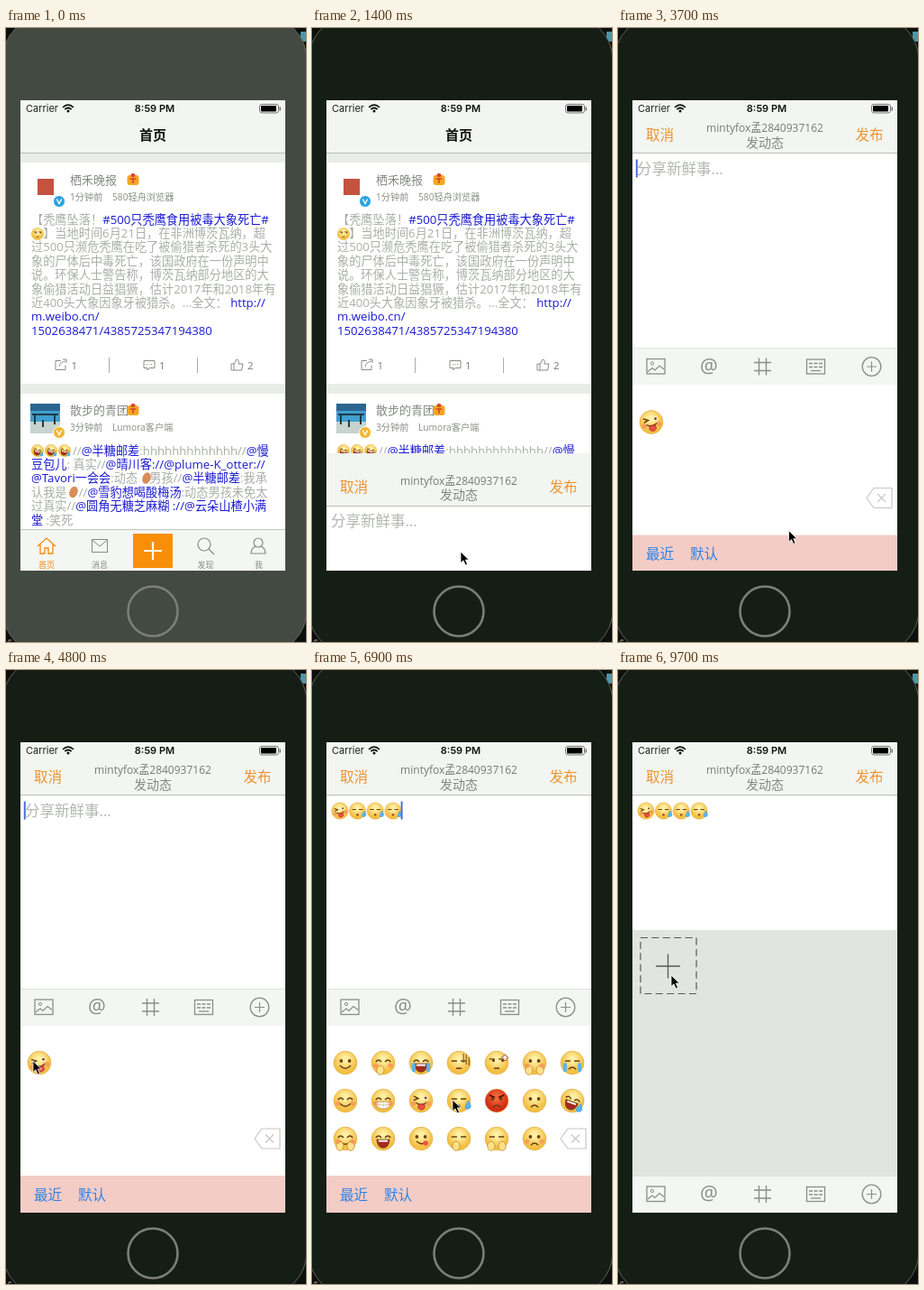
An HTML page that plays this animation: 333x680 px, repeating every 10 s.

```html
<!DOCTYPE html>
<html lang="zh">
<head>
<meta charset="utf-8">
<style>
html, body { margin: 0; width: 100%; height: 100%; overflow: hidden; background: #0c0f0c; }
svg { display: block; }
text { font-family: "Open Sans", "Noto Sans CJK SC", "Noto Sans CJK", sans-serif; }
.ui { font-family: Inter, "Noto Sans CJK SC", sans-serif; }
</style>
</head>
<body>
<svg id="stage" width="333" height="680" viewBox="0 0 333 680"></svg>
<script>
const rect = (x, y, w, h, fill, more = '') =>
  `<rect x="${x}" y="${y}" width="${w}" height="${h}" fill="${fill}" ${more}/>`;
const line = (d, stroke, w = 1, fill = 'none') =>
  `<path d="${d}" stroke="${stroke}" stroke-width="${w}" fill="${fill}"/>`;
const dot = (x, y, r, fill, more = '') =>
  `<circle cx="${x}" cy="${y}" r="${r}" fill="${fill}" ${more}/>`;
const text = (x, y, size, fill, s, more = '') =>
  `<text x="${x}" y="${y}" font-size="${size}" fill="${fill}" ${more}>${s}</text>`;
const at = (x, y, s, more = '') => `<g transform="translate(${x} ${y}) ${more}">${s}</g>`;
const mid = 'text-anchor="middle"';

// Running text; braces mark links
const rich = (x, y, s) => text(x, y, 13.2, '#a9aea7',
  s.replace(/\{(.*?)\}/g, '<tspan fill="#1a1ad2">$1</tspan>'));

// Face parts in a circle of radius 13
const ink = '#6b3d10';
const tear = '#58b4ee';
const hand = (x) => `<ellipse cx="${x}" cy="8" rx="4" ry="5" fill="#ffe28a" stroke="#c58a28" stroke-width=".8"/>`;
const parts = {
  dots: dot(-4.5, -2, 1.8, ink) + dot(4.5, -2, 1.8, ink),
  happy: line('M-8 -1q3 -4 6 0M2 -1q3 -4 6 0', ink, 1.5),
  lids: line('M-8 -2h6M2 -2h6', ink, 1.6),
  side: line('M-8 -4h6M2 -4h6', ink, 1.3) + dot(-3.5, -2.5, 1.5, ink) + dot(6.5, -2.5, 1.5, ink),
  wink: line('M-8 -5l5 2.5l-5 2', ink, 1.5) + dot(5, -3, 2.2, '#fff') + dot(5, -3, 1.4, ink),
  smile: line('M-6 3q6 6 12 0', ink, 1.4),
  frown: line('M-4 7q4 -4 8 0', ink, 1.4),
  flat: line('M-3 6h6', ink, 1.5),
  small: dot(0, 6, 1.8, '#a4502a'),
  open: line('M-7 1h14q-1 9 -7 9t-7 -9z', ink, .8, '#a52a20') + line('M-5 2.5h10', '#fff', 2),
  teeth: line('M-9 1h18q-1 8 -9 8t-9 -8z', '#b98035', .8, '#fff') + line('M-8 4.5h16M-4 1v7M0 1v8M4 1v7', '#c9b48c', .6),
  tongue: line('M-6 2q6 4 12 0', ink, 1.3) + line('M-3 4h7v4q-3.5 4 -7 0z', '#b8322c', .8, '#e84f46'),
  lick: line('M-5 3q6 5 11 0', ink, 1.4) + dot(5, 5, 2.7, '#e8574a'),
  blush: dot(-8, 3, 2.6, '#f78c5c', 'opacity=".7"') + dot(8, 3, 2.6, '#f78c5c', 'opacity=".7"'),
  drop: line('M10 0q6 8 0 9t0 -9z', '#3b98d8', .6, tear),
  tears: rect(-10, 0, 4, 10, tear, 'rx="2"') + rect(6, 0, 4, 10, tear, 'rx="2"'),
  lines: line('M5 -10v10M8 -9v11M11 -6v9', '#7b4a14', 1),
  cross: line('M9 -9v7M5.5 -5.5h7', '#b06030', 3) + line('M9 -8v5M6.5 -5.5h5', '#fff', 1.5),
  brows: line('M-8 -6l6 2.5M8 -6l-6 2.5', '#4b0a05', 1.6),
  hands: hand(-6) + hand(6),
  palm: hand(-3),
};
const face = (x, y, r, spec, turn = 0) => at(x, y,
  dot(0, 0, 12.6, spec.includes('red') ? 'url(#rage)' : 'url(#skin)', 'stroke="#e0a638" stroke-width=".6"') +
  spec.split(' ').map(k => parts[k] || '').join(''), `scale(${r / 13}) rotate(${turn})`);

const WINK = 'wink tongue blush', SLEEPY = 'lids small drop';
const faces = [
  'dots smile', 'happy palm blush', 'happy open tears', 'lids flat lines', 'side flat cross', 'dots hands blush', 'lids frown tears',
  'happy smile blush', 'happy teeth blush', WINK, SLEEPY, 'red brows dots frown', 'dots frown', 'happy open drop',
  'happy smile hands blush', 'happy open', 'dots lick', 'lids palm', 'lids hands', 'dots frown blush'];

const doll = (x, y) => `<ellipse cx="${x}" cy="${y}" rx="4.5" ry="6.5" fill="#d98c58" transform="rotate(20 ${x} ${y})"/>`;
const gift = (x, y) => rect(x, y, 13, 11, '#f5a623', 'rx="3"') + rect(x + 4, y - 2, 5, 4, '#d9452f', 'rx="2"') +
  line(`M${x + 3} ${y + 4}h7M${x + 6.5} ${y + 3}v6`, '#d9452f', 1.6);
const badge = (x, y, c) => dot(x, y, 6.5, c, 'stroke="#fff"') + line(`M${x - 2.7} ${y - 2.5}l2.7 5l2.7 -5`, '#fff', 1.4);
const head = (y, name, ago, from) => text(71, y, 13, '#858983', name) +
  text(71, y + 17.5, 10.2, '#8a8e88', ago) + text(118, y + 17.5, 10.2, '#8a8e88', from) + gift(134.5, y - 10);

const paragraph = (y, rows) => rows.map((s, i) => rich(28, y + i * 15.4, s)).join('');

function feed() {
  const g = '#888c86';
  const tab = (x, label, c = g) => text(x, 597.5, 9, c, label, mid);
  return rect(16, 80, 294, 521, '#e9ede8') + rect(16, 149, 294, 245, '#fff') + rect(16, 405, 294, 196, '#fff') +
    rect(16, 80, 294, 58, '#f2f5f1') + rect(16, 138, 294, 1, '#b9bdb8') +
    text(163, 123.5, 15, '#111', '首页', mid + ' font-weight="600"') +
    rect(35, 167, 18, 18, '#c4523f') + badge(59, 192, '#2aa3e0') +
    head(173, '栖禾晚报', '1分钟前', '580轻舟浏览器') +
    paragraph(216.5, [
      '【秃鹰坠落！{#500只秃鹰食用被毒大象死亡#}',
      '\u2003】当地时间6月21日，在非洲博茨瓦纳，超',
      '过500只濒危秃鹰在吃了被偷猎者杀死的3头大',
      '象的尸体后中毒死亡，该国政府在一份声明中',
      '说。环保人士警告称，博茨瓦纳部分地区的大',
      '象偷猎活动日益猖獗，估计2017年和2018年有',
      '近400头大象因象牙被猎杀。...全文： {http://}',
      '{m.weibo.cn/}',
      '{1502638471/4385725347194380}']) +
    face(35, 228, 7, 'side flat') +
    line('M61 368.5h-6v10h11v-5M59 375q1 -5 7 -6M63 367h4v4', g) +
    line('M153 368.5h12v8h-6l-2 2.5v-2.5h-4zM156 372.5h1M158.500 372.5h1M161 372.5h1', g) +
    line('M250 372h3v7h-3zM253 372l3 -5q3 0 2 5h5l-1.500 7h-8.500', g) +
    line('M114.500 365v17M212.500 365v17', '#a9ada7') +
    text(72.5, 378, 11.5, '#777b75', '1') + text(170, 378, 11.5, '#777b75', '1') + text(268, 378, 11.5, '#777b75', '2') +
    rect(27, 416, 33, 33, '#3f9fd0') + rect(27, 416, 33, 8, '#2c6690') + rect(27, 436, 33, 13, '#c7d3cf') +
    line('M32 439v-11M54 439v-11M41 442v-8M29 428h29', '#1f3a46', 2) + badge(59, 448, '#f2b632') +
    head(428, '散步的青团', '3分钟前', 'Lumora客户端') +
    [35, 50, 65].map(x => face(x, 468, 7, 'happy open drop', 15)).join('') +
    rich(74, 472.5, '//{@半糖邮差}:hhhhhhhhhhhhh//{@慢}') +
    paragraph(487.9, [
      '{豆包儿}: 真实//{@晴川客://@plume-K_otter://}',
      '{@Tavori一会会}:动态\u2003男孩//{@半糖邮差}:我承',
      '认我是\u2003//{@雪豹想喝酸梅汤}:动态男孩未免太',
      '过真实//{@圆角无糖芝麻糊 ://@云朵山楂小满}',
      '{堂} :笑死']) +
    doll(156, 498.5) + doll(75, 514) +
    rect(16, 555, 294, 46, '#f4f6f3') + rect(16, 555, 294, 1, '#c3c6c2') +
    line('M35 574l10 -9l10 9M38 572v10h5v-6h4v6h5v-10', '#f58a0b', 1.3) +
    rect(95.5, 566.5, 17, 14, 'none', `stroke="${g}"`) + line('M95.500 567l8.500 7l8.500 -7', g) +
    rect(141, 560, 44, 38, '#f98f08') + line('M153 579h20M163 569v20', '#fff', 2.2) +
    dot(220, 572, 7, 'none', `stroke="${g}" stroke-width="1.2"`) + line('M225 577l6 6', g, 1.3) +
    dot(280, 570, 5, 'none', `stroke="${g}" stroke-width="1.2"`) + line('M277 574q-5 2 -5 8h16q0 -6 -5 -8', g, 1.2) +
    tab(45, '首页', '#f58a0b') + tab(104, '消息') + tab(221.5, '发现') + tab(280.5, '我');
}

function status() {
  return text(22, 93, 11, '#222', 'Carrier', 'class="ui"') +
    text(165, 93, 11, '#111', '8:59 PM', mid + ' class="ui" font-weight="600"') +
    line('M63 88q6 -6 12 0M65.300 90.200q3.700 -3.400 7.400 0', '#111', 1.7) + dot(69, 92, 1.5, '#111') +
    rect(281.500, 84.500, 21, 9.500, 'none', 'rx="2.500" stroke="#777"') + rect(283, 86, 17, 6.500, '#000', 'rx="1"') +
    rect(303.500, 87.500, 1.500, 4, '#777');
}

function compose() {
  const o = '#ee9330';
  return rect(16, 80, 294, 521, '#fff') + rect(16, 80, 294, 58, '#f2f5f1') + rect(16, 138, 294, 1, '#bbbfba') +
    text(31, 123.5, 15.6, o, '取消') + text(263.5, 123.5, 15.6, o, '发布') +
    text(163, 115, 12, '#777b76', 'mintyfox孟2840937162', mid) + text(163, 131.5, 14, '#858984', '发动态', mid) +
    text(21, 161.5, 16.5, '#b3b7b2', '分享新鲜事...', 'id="hint"') +
    [31, 50.5, 70.2, 90].map((x, i) => `<g class="typed">${face(x, 156, 9.5, i ? SLEEPY : WINK, i ? 0 : -10)}</g>`).join('') +
    rect(0, 145.5, 2, 20, '#4b6fe0', 'id="caret"') +
    `<g id="panel">${rect(16, 288, 294, 313, '#e1e5df')}<g id="add">` +
    rect(25, 296.5, 62, 62, 'none', 'stroke="#555a54" stroke-width="1.200" stroke-dasharray="8 4.400"') +
    line('M42 328h27M55.500 314.500v27', '#555a54', 1.3) + '</g></g>' +
    `<g id="dock">${toolbar()}${keyboard()}</g>`;
}

function toolbar() {
  const g = '#8b8f8a';
  return rect(16, 353, 294, 41, '#f3f6f2') + rect(16, 353, 294, .6, '#d0d4cf') +
    rect(32, 365, 20, 16.5, 'none', `stroke="${g}" stroke-width="1.300"`) +
    line('M33 379l5 -4l3 2.500l5 -5l5 4', g, 1.2) + dot(38, 370, 1.6, 'none', `stroke="${g}"`) +
    text(101, 380, 22, g, '@', mid) +
    line('M151 369h19M151 378h19M156.500 364v19M164.500 364v19', g, 1.4) +
    `<g id="smiley">${dot(219.500, 373.500, 10, 'none', `stroke="${g}" stroke-width="1.300"`)}` +
    line('M214 377q5.500 5 11 0M214 371h3M222 371h3', g, 1.3) + '</g>' +
    `<g id="keys">${rect(209.500, 365.500, 20, 16, 'none', `stroke="${g}" stroke-width="1.300"`)}` +
    line('M212 370h15M212 374h15', g, 1.4).replace('/>', ' stroke-dasharray="4 1.500"/>') + line('M214 378h11', g, 1.3) + '</g>' +
    dot(281.5, 373.5, 10.3, 'none', `stroke="${g}" stroke-width="1.300"`) + line('M276 373.500h11M281.500 368v11', g, 1.2);
}

function keyboard() {
  const del = line('M276 519l8 -11h20v22h-20zM288 514.500l9 9M297 514.500l-9 9', '#c5c9c4', 1.2);
  const grid = faces.map((s, i) =>
    face(37 + i % 7 * 42, 435 + Math.floor(i / 7) * 42, 13.3, s, i === 13 ? 20 : 0)).join('');
  return rect(16, 394, 294, 207, '#fff') +
    `<g id="pages">${face(37, 435, 13.3, WINK, -10)}${del}${at(294, 0, grid + del)}</g>` +
    rect(16, 560, 294, 41, '#f4ccc6') +
    text(31, 586.5, 15.6, '#2f83e4', '最近') + text(80, 586.5, 15.6, '#2f83e4', '默认');
}

const body = fill => rect(-4, -14, 338, 708, fill, 'rx="50" stroke="#5c625a"');
document.getElementById('stage').innerHTML = `<defs>
  <radialGradient id="skin" cy=".35"><stop offset=".2" stop-color="#fff0a4"/><stop offset="1" stop-color="#f3c044"/></radialGradient>
  <radialGradient id="rage" cy=".35"><stop offset=".2" stop-color="#f4673a"/><stop offset="1" stop-color="#cf2d14"/></radialGradient>
  <clipPath id="screen">${rect(16, 80, 294, 521, '#fff')}</clipPath></defs>` +
  rect(0, 0, 333, 680, '#0c0f0c') + rect(327, 4, 6, 11, '#4b97a8') +
  text(2, 681, 8, '#aaa', 'e') + body('#151e15') + `<g id="glow">${body('#434a41')}</g>` +
  dot(163, 646, 27.5, 'none', 'stroke="#7b7f79" stroke-width="2.600"') +
  `<g clip-path="url(#screen)">${feed()}<g id="compose">${compose()}</g>${status()}</g>` +
  '<path id="cursor" d="M0 0v12.500l3 -2.700l2.200 5l2.300 -1l-2.200 -4.800h4z" fill="#000" stroke="#fff" stroke-width=".8"/>';

const $ = id => document.getElementById(id);
const typed = [...document.querySelectorAll('.typed')];
const typeTimes = [4900, 6400, 6600, 6800];
const path = [
  [400, 330, 610], [1100, 163, 578], [1400, 165, 580], [1800, 165, 580], [2200, 167, 512], [2400, 167, 512],
  [2800, 208, 571], [3500, 208, 571], [4500, 30, 433], [4900, 30, 433], [5300, 95, 573], [5500, 95, 573],
  [6300, 156, 476], [7000, 156, 476], [7600, 42, 371], [7900, 44, 372], [8100, 48, 378], [8500, 56, 372],
  [8700, 56, 372], [9000, 59, 338]];

const move = (id, x, y) => $(id).setAttribute('transform', `translate(${x} ${y})`);
const show = (el, on) => el.setAttribute('opacity', +on);

// Critically damped spring from 0 to 1
function spring(t, start, rate) {
  const k = Math.max(0, t - start) / 1000 * rate;
  const p = 1 - (1 + k) * Math.exp(-k);
  return p > .995 ? 1 : p;
}

function pointer(t) {
  const i = path.findIndex(k => k[0] > t);
  if (i < 0) return path[path.length - 1].slice(1);
  if (i === 0) return path[0].slice(1);
  const a = path[i - 1], b = path[i];
  let p = (t - a[0]) / (b[0] - a[0]);
  p *= p * (3 - 2 * p);
  return [a[1] + (b[1] - a[1]) * p, a[2] + (b[2] - a[2]) * p];
}

function draw(t) {
  show($('glow'), t < 100 ? 1 : t < 200 ? .4 : 0);
  move('compose', 0, 521 * (1 - spring(t, 1300, 9.6)));
  const up = spring(t, 3200, 14), down = spring(t, 7730, 14);
  move('dock', 0, 207 * (1 - up + down));
  move('pages', -294 * spring(t, 5350, 14), 0);
  move('panel', 0, 272 * (1 - spring(t, 7950, 12)));
  show($('panel'), t > 7950);
  show($('add'), t < 9200 ? .5 : 1);
  show($('smiley'), t < 3300);
  show($('keys'), t >= 3300);
  const n = typeTimes.filter(k => t > k).length;
  typed.forEach((el, i) => show(el, i < n));
  show($('hint'), !n);
  $('caret').setAttribute('x', 19.8 + n * 19.7);
  show($('caret'), t >= 2400 && t < 7700 && (t - 2400) % 1000 < 600);
  show($('cursor'), t >= 400);
  move('cursor', ...pointer(t));
}

let begin;
function tick(now) {
  begin ??= now;
  draw(Math.floor((now - begin) % 10000 / 100) * 100);
  requestAnimationFrame(tick);
}
draw(0);
requestAnimationFrame(tick);
</script>
</body>
</html>
```
